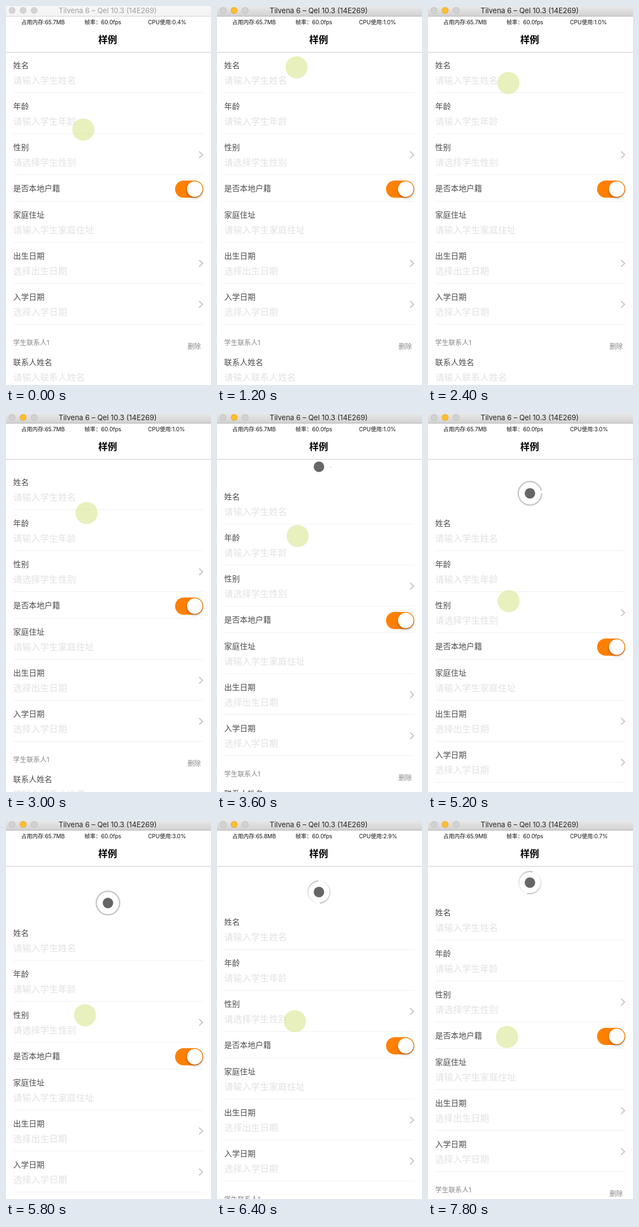
These frames come from a looping animation (371x684 px, 8 s). An HTML page with a canvas:

```html
<!DOCTYPE html>
<html lang="zh">
<head>
<meta charset="utf-8">
<title>样例</title>
<style>
html, body { margin: 0; width: 100%; height: 100%; overflow: hidden; background: #fff; }
canvas { display: block; width: 371px; height: 684px; }
</style>
</head>
<body>
<canvas id="stage"></canvas>
<script>
const W = 371, H = 684, LOOP = 8000, STEP = 200, NAV_BOTTOM = 84;
const RELEASE = 6250, TAU = Math.PI * 2;
const FONT = 'Inter, "Noto Sans CJK SC", "Noto Sans CJK", sans-serif';
const canvas = document.getElementById('stage');
const ctx = canvas.getContext('2d');
const dpr = window.devicePixelRatio || 1;
canvas.width = W * dpr;
canvas.height = H * dpr;

// Keys: time, then values
const pullKeys = [
  [2500, 0], [3000, 18], [3600, 44], [4000, 56], [4200, 62], [5200, 92],
  [6200, 100], [6400, 77], [6600, 62], [6800, 60]
];
const touchKeys = [
  [0, 140, 223], [400, 141, 218], [600, 141, 218], [1400, 145, 75],
  [1600, 145, 75], [2000, 146, 28], [2400, 145.5, 139], [3600, 146, 222],
  [4000, 147, 243], [4200, 147, 254], [5200, 146, 339.5], [6200, 141, 361],
  [6400, 141, 363], [7800, 143, 391.5]
];
const stats = [
  { at: 0, memory: '65.7', cpu: '0.4' },
  { at: 1000, memory: '65.7', cpu: '1.0' },
  { at: 4000, memory: '65.7', cpu: '3.0' },
  { at: 6000, memory: '65.8', cpu: '2.9' },
  { at: 7000, memory: '65.9', cpu: '0.7' }
];
const rows = [
  { label: '姓名', hint: '请输入学生姓名' },
  { label: '年龄', hint: '请输入学生年龄' },
  { label: '性别', hint: '请选择学生性别', chevron: true },
  { label: '是否本地户籍', toggle: true },
  { label: '家庭住址', hint: '请输入学生家庭住址' },
  { label: '出生日期', hint: '选择出生日期', chevron: true },
  { label: '入学日期', hint: '选择入学日期', chevron: true }
];

function sample(keys, t) {
  const next = keys.findIndex(key => key[0] > t);
  if (next === 0) return keys[0].slice(1);
  if (next < 0) return keys[keys.length - 1].slice(1);
  const a = keys[next - 1], b = keys[next];
  const k = (t - a[0]) / (b[0] - a[0]);
  return a.slice(1).map((v, i) => v + (b[i + 1] - v) * k);
}

function text(str, x, centerY, size, color, { align = 'left', weight = 400 } = {}) {
  ctx.font = `${weight} ${size}px ${FONT}`;
  ctx.textAlign = align;
  ctx.fillStyle = color;
  ctx.fillText(str, x, centerY + size * 0.37);
}

function rect(x, y, w, h, color) {
  ctx.fillStyle = color;
  ctx.fillRect(x, y, w, h);
}

function disc(x, y, r, color) {
  ctx.fillStyle = color;
  ctx.beginPath();
  ctx.arc(x, y, r, 0, TAU);
  ctx.fill();
}

function arc(x, y, r, sweep, width, color) {
  ctx.strokeStyle = color;
  ctx.lineWidth = width;
  ctx.beginPath();
  ctx.arc(x, y, r, 0, sweep);
  ctx.stroke();
}

function drawChevron(y) {
  ctx.strokeStyle = '#c7c7cc';
  ctx.lineWidth = 2;
  ctx.beginPath();
  ctx.moveTo(349.5, y - 6);
  ctx.lineTo(355.8, y);
  ctx.lineTo(349.5, y + 6);
  ctx.stroke();
}

function drawToggle(y) {
  ctx.fillStyle = '#ff8000';
  ctx.beginPath();
  ctx.roundRect(306, y, 51, 31, 15.5);
  ctx.fill();
  ctx.save();
  ctx.shadowColor = 'rgba(0,0,0,.3)';
  ctx.shadowBlur = 4 * dpr;
  ctx.shadowOffsetY = 2.5 * dpr;
  disc(341.6, y + 15.5, 14, '#fff');
  ctx.restore();
}

function drawField(label, hint, top) {
  text(label, 13, top + 25, 14.15, '#4c4c4c');
  if (hint) text(hint, 13, top + 52, 16.25, '#e1e1e1');
}

function drawForm(pull) {
  let top = 82 + pull;
  for (const row of rows) {
    drawField(row.label, row.hint, top);
    if (row.chevron) drawChevron(top + 38.5);
    if (row.toggle) drawToggle(top + 11);
    top += row.toggle ? 48 : 74;
    rect(13, top, 344, 1, '#f0f0f0');
  }
  text('学生联系人1', 13, top + 33.7, 12.1, '#888');
  text('删除', 328.5, top + 41, 12.1, '#888');
  drawField('联系人姓名', '请输入联系人姓名', top + 44);
}

// Two opposite heads, each with a fading half-turn tail
function drawSpinner(x, y, head) {
  const fade = ctx.createConicGradient(head, x, y);
  for (const half of [0, 0.5]) {
    fade.addColorStop(half, 'rgba(196,196,196,0)');
    fade.addColorStop(half + 0.5, 'rgba(196,196,196,1)');
  }
  arc(x, y, 20, TAU, 2.3, fade);
}

function drawRefresh(t, pull) {
  const x = 184.5, y = 53 + pull;
  disc(x, y, 9.5, '#666');
  if (t > RELEASE) {
    const degrees = 85 + (t - 6400) * 0.4;
    drawSpinner(x, y, degrees / 360 * TAU);
  } else if (pull > 43) {
    const progress = Math.min(1, (pull - 43) / 50.5) ** 1.2;
    arc(x, y, 21.2, progress * TAU, 2.5, '#c8c8c8');
  }
}

function drawWindowBar(active) {
  const shade = ctx.createLinearGradient(0, 0, 0, 18);
  shade.addColorStop(0, active ? '#e9e9e9' : '#f6f6f6');
  shade.addColorStop(1, active ? '#d2d2d2' : '#f4f4f4');
  rect(0, 0, W, 18, shade);
  rect(0, 18, W, 1, active ? '#b4b4b4' : '#d2d2d2');
  [11, 31, 51].forEach((x, i) => {
    const lit = active && i === 1;
    disc(x, 8, 6, lit ? '#dfa023' : active ? '#b9b9b9' : '#c8c8c8');
    disc(x, 8, 5.2, lit ? '#ffbd2e' : active ? '#d2d2d2' : '#d4d4d4');
  });
  text('Tilvena 6 – Qel 10.3 (14E269)', 184, 8.5, 13, active ? '#262626' : '#a0a0a0', { align: 'center' });
}

function drawNav(t) {
  const { memory, cpu } = stats.filter(s => s.at <= t).pop();
  rect(0, 19, W, 64, '#fff');
  rect(0, 83, W, 1, '#cbcbcb');
  text(`占用内存:${memory}MB`, 27.5, 29, 10, '#111');
  text('帧率：60.0fps', 142, 29, 10, '#111');
  text(`CPU使用:${cpu}%`, 257, 29, 10, '#111');
  text('样例', 184, 61, 17, '#000', { align: 'center', weight: 700 });
}

function draw(now) {
  const t = Math.floor(now % LOOP / STEP) * STEP;
  const [pull] = sample(pullKeys, t);
  const [touchX, touchY] = sample(touchKeys, t);
  ctx.setTransform(dpr, 0, 0, dpr, 0, 0);
  rect(0, 0, W, H, '#fff');
  ctx.save();
  ctx.beginPath();
  ctx.rect(0, NAV_BOTTOM, W, H - NAV_BOTTOM);
  ctx.clip();
  drawForm(pull);
  drawRefresh(t, pull);
  ctx.restore();
  drawNav(t);
  drawWindowBar(t >= 200);
  disc(touchX, touchY, 20, 'rgba(217,230,147,.6)');
}

const start = performance.now();
function tick() {
  draw(performance.now() - start);
  requestAnimationFrame(tick);
}
tick();
</script>
</body>
</html>
```
